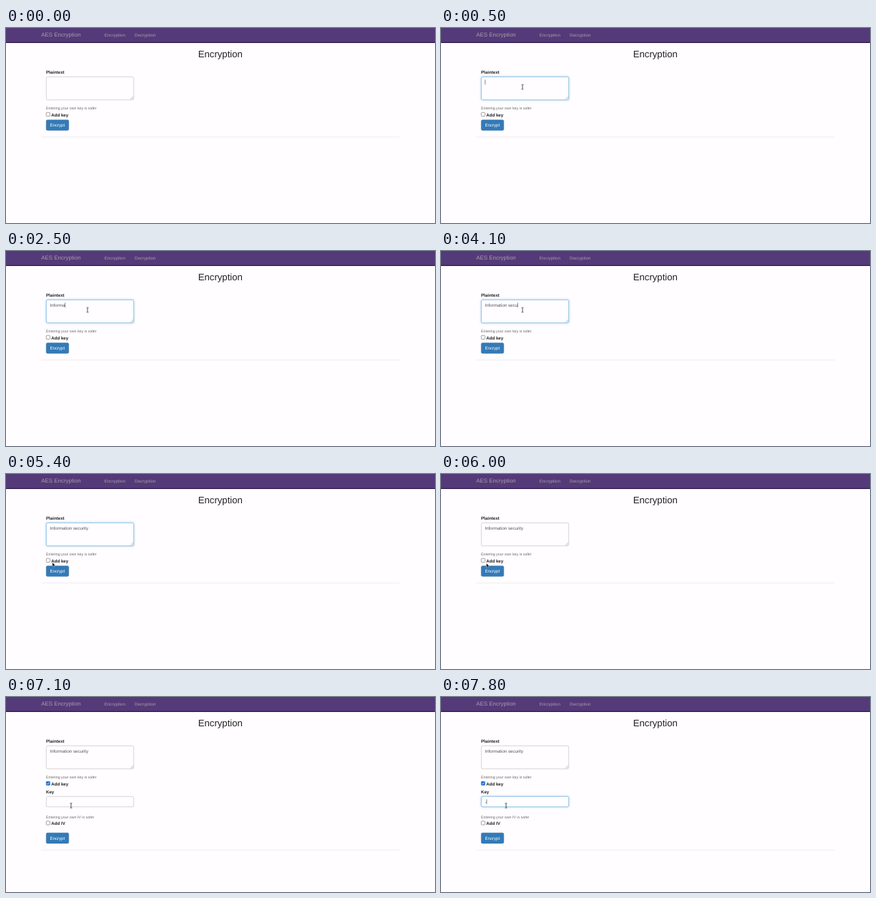
An HTML page with a canvas for the animation above (8 s loop, 600 px wide and 273 px high).

```html
<!DOCTYPE html>
<html lang="en">
<head>
<meta charset="utf-8">
<title>AES Encryption</title>
<style>
  html, body { margin: 0; width: 100%; height: 100%; overflow: hidden; background: #fffdff; }
  canvas { display: block; }
</style>
</head>
<body>
<canvas id="stage" width="600" height="273"></canvas>
<script>
const ctx = document.getElementById('stage').getContext('2d');
const LOOP = 8000, STEP = 100;
const FONT = '"Liberation Sans", Arial, sans-serif';
const BODY = 6.15, SMALL = 5.27, LEFT = 56, WIDTH = 123;
const PAPER = '#fffdff', INK = '#222';
const MESSAGE = 'Information security';
const FOCUS = 400, TYPE_START = 1300, KEY_GAP = 179, BLUR = 5700;
const CHECKED = 7000, KEY_FOCUS = 7500, KEY_TYPED = 7800;

// The pointer rests in the text area, then glides to each stop in turn.
const REST = { x: 114, y: 82.5 };
const MOVES = [
  { start: 4900, end: 5500, x: 63.5, y: 125 },
  { start: 6300, end: 6900, x: 86, y: 137 },
  { start: 6900, end: 7100, x: 91, y: 152 },
];

const clamp = v => Math.max(0, Math.min(1, v));
const easeOut = k => 1 - (1 - k) ** 2;

function text(str, x, y, size = BODY, color = INK, weight = 'normal', align = 'left') {
  ctx.font = `${weight} ${size}px ${FONT}`;
  ctx.textAlign = align;
  ctx.fillStyle = color;
  ctx.fillText(str, x, y);
}

const label = (str, x, y) => text(str, x, y, BODY, INK, 'bold');
const hint = (str, y) => text(str, LEFT, y, SMALL, '#6a6a6a');

function line(x1, y1, x2, y2, color, width = 0.6) {
  ctx.beginPath();
  ctx.moveTo(x1, y1);
  ctx.lineTo(x2, y2);
  ctx.strokeStyle = color;
  ctx.lineWidth = width;
  ctx.stroke();
}

function box(x, y, w, h, r, fill, stroke, width = 0.7) {
  ctx.beginPath();
  ctx.roundRect(x + width / 2, y + width / 2, w - width, h - width, r);
  ctx.fillStyle = fill;
  ctx.fill();
  ctx.strokeStyle = stroke;
  ctx.lineWidth = width;
  ctx.stroke();
}

function field(y, h, focus) {
  ctx.save();
  ctx.shadowColor = `rgba(102,175,233,${0.5 * focus})`;
  ctx.shadowBlur = 3.5;
  ctx.beginPath();
  ctx.roundRect(LEFT, y, WIDTH, h, 1.8);
  ctx.fillStyle = PAPER;
  ctx.fill();
  ctx.restore();
  box(LEFT, y, WIDTH, h, 1.8, PAPER, '#c6c4c6');
  ctx.globalAlpha = focus;
  box(LEFT, y, WIDTH, h, 1.8, PAPER, '#84c0e6', 0.8);
  ctx.globalAlpha = 1;
}

function typed(str, y, caret) {
  text(str, 61.5, y, BODY, '#555');
  const x = 61.8 + ctx.measureText(str).width;
  if (caret) line(x, y - 5.4, x, y + 1.2, '#333');
}

function checkbox(y, str, checked) {
  const blue = '#1a6fd0';
  box(LEFT, y, 5.8, 5.8, 0.9, checked ? blue : '#fff', checked ? blue : '#666', 0.6);
  if (checked) {
    line(57.3, y + 2.9, 58.5, y + 4.2, '#fff', 0.8);
    line(58.5, y + 4.2, 60.6, y + 1.5, '#fff', 0.8);
  }
  label(str, 63.3, y + 5.7);
}

function submitRow(y, ruleY) {
  box(LEFT, y, 32, 15.2, 1.8, '#337ab7', '#2e6da4', 0.5);
  text('Encrypt', 61.4, y + 9.7, BODY, '#fff');
  line(49.5, ruleY, 550.5, ruleY, '#eeecee', 0.9);
}

function pointerAt(t) {
  let { x, y } = REST;
  for (const move of MOVES) {
    const k = easeOut(clamp((t - move.start) / (move.end - move.start)));
    x += (move.x - x) * k;
    y += (move.y - y) * k;
  }
  return { x, y };
}

function shape(path, fill, stroke) {
  const outline = new Path2D(path);
  ctx.fillStyle = fill;
  ctx.fill(outline);
  ctx.strokeStyle = stroke;
  ctx.lineWidth = 0.4;
  ctx.stroke(outline);
}

function pointer(t) {
  const { x, y } = pointerAt(t);
  const open = t >= CHECKED;
  const within = (top, bottom, width) => x < LEFT + width && y > top && y < bottom;
  ctx.save();
  ctx.translate(x, y);
  if (within(68, 101, WIDTH) || (open && within(139, 154, WIDTH))) {
    line(0, -3.2, 0, 3.2, INK, 0.8);
    for (const end of [-3.3, 3.3]) line(-1.6, end, 1.6, end, '#333');
  } else if (!open && within(128, 143, 32)) {
    shape('M-.6 0H.4L.5 2.6 2 3V5L1.4 6.6H-1L-2 4Z', '#e8e8ec', '#444');
  } else {
    shape('M0 0V5.6L1.2 4.5 2 6.3 3 5.9 2.2 4.1H4Z', '#000', '#eee');
  }
  ctx.restore();
}

function navbar() {
  ctx.fillStyle = '#553a79';
  ctx.fillRect(0, 0, 600, 21);
  line(0, 20.4, 600, 20.4, '#301b50', 1.2);
  text('AES Encryption', 49.3, 12.4, 7.91, '#a59dac');
  text('Encryption', 137.8, 12, BODY, '#a59dac');
  text('Decryption', 180, 12, BODY, '#a59dac');
}

function draw(t) {
  const fade = start => clamp((t - start + STEP) / 200);
  const count = Math.max(0, Math.min(MESSAGE.length, Math.floor((t - TYPE_START) / KEY_GAP) + 1));
  const lastKey = count ? TYPE_START + (count - 1) * KEY_GAP : FOCUS;
  const caret = t >= FOCUS && t < BLUR && (t - lastKey) % 1000 < 500;
  const open = t >= CHECKED;

  ctx.fillStyle = PAPER;
  ctx.fillRect(0, 0, 600, 273);
  navbar();
  text('Encryption', 299.8, 41, 13.18, INK, 'normal', 'center');

  label('Plaintext', LEFT, 63.8);
  field(68, 33, fade(FOCUS) - fade(BLUR));
  for (const d of [2, 4]) line(178 - d, 99.8, 178, 99.8 - d, '#888', 0.5);
  typed(MESSAGE.slice(0, count), 77.9, caret);

  hint('Entering your own key is safer', 114);
  checkbox(118, 'Add key', open);
  if (open) {
    label('Key', LEFT, 134.8);
    field(138.9, 15.2, fade(KEY_FOCUS));
    typed(t >= KEY_TYPED ? '-' : '', 148.8, t >= KEY_FOCUS);
    hint('Entering your own IV is safer', 169.5);
    checkbox(173.5, 'Add IV', false);
    submitRow(190, 214.3);
  } else {
    submitRow(128.4, 152.6);
  }
  if (t >= FOCUS) pointer(t);
}

ctx.textRendering = 'geometricPrecision';
const start = performance.now();
function tick() {
  const t = (performance.now() - start) % LOOP;
  draw(Math.floor(t / STEP) * STEP);
  requestAnimationFrame(tick);
}
tick();
</script>
</body>
</html>
```
